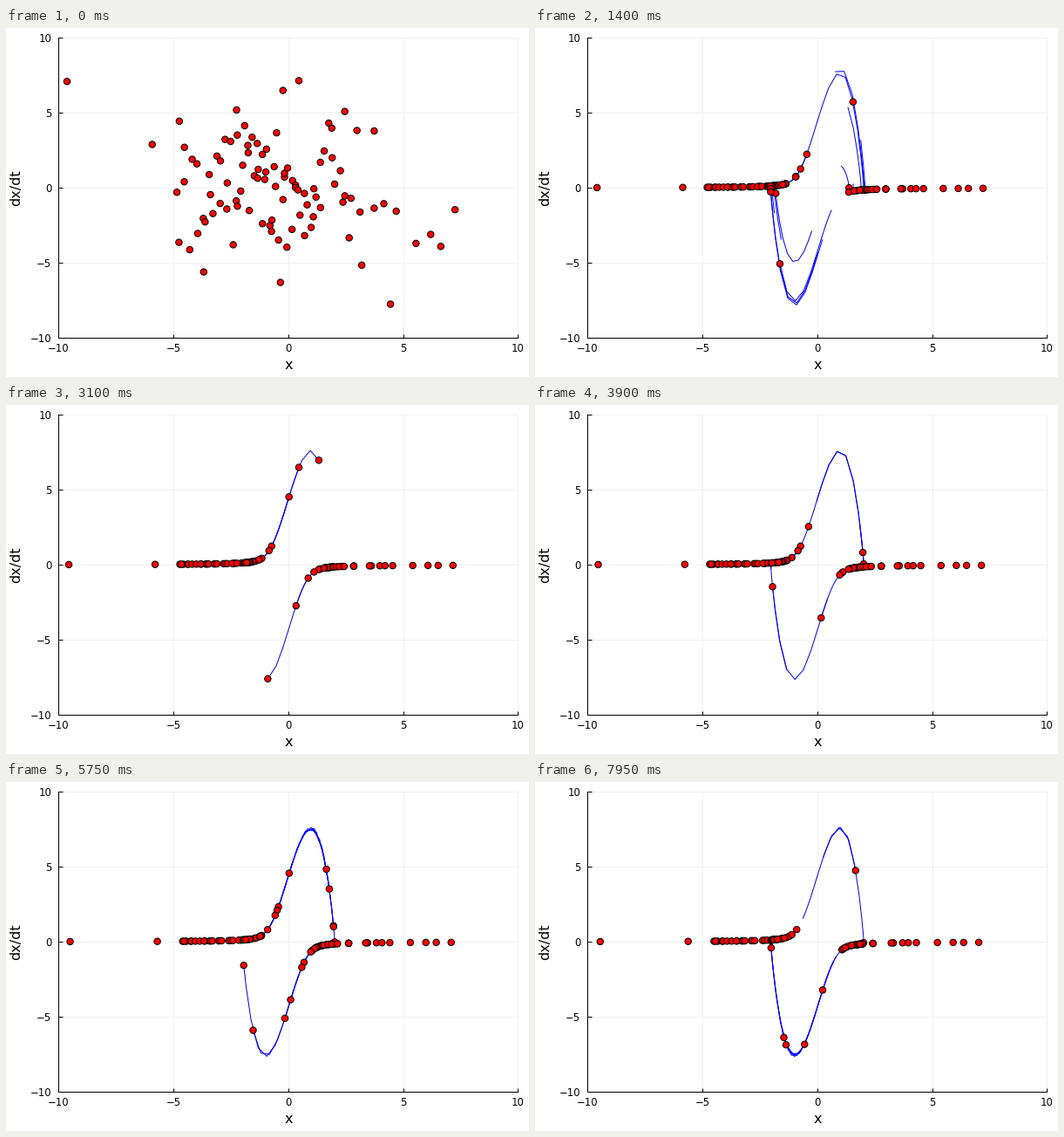
A matplotlib script that plays this animation: 600x400 px, repeating every 8000 ms.

```python
import numpy as np
import matplotlib.pyplot as plt
from matplotlib.animation import FuncAnimation
from matplotlib.collections import LineCollection

W, H, DPI = 600, 400, 100
PX = 72 / DPI                     # one pixel in points
LEFT, RIGHT, TOP, BOTTOM = 60.2, 587.4, 11.4, 355.2
FRAMES, INTERVAL = 160, 50
MU, DT, SUBSTEPS, TAIL = 5.0, 0.05, 25, 10
CLOUD = 79

plt.rcParams["font.family"] = "DejaVu Sans"

# Outlying starting states (x, dx/dt); the rest form a random cloud.
OUTLIERS = [
    (-9.63, 7.1), (-5.92, 2.9), (-4.74, 4.45), (-2.25, 5.2), (-0.23, 6.5),
    (0.46, 7.15), (2.46, 5.1), (3.74, 3.8), (-3.68, -5.6), (-0.34, -6.3),
    (3.2, -5.15), (3.74, -1.35), (4.16, -1.05), (4.7, -1.55), (4.45, -7.75),
    (5.56, -3.7), (6.2, -3.1), (6.64, -3.9), (7.26, -1.45),
]


def spread(t):
    """Map -1..1 to a bell-like spread, dense in the middle."""
    return 2.9 * t + 1.2 * t ** 3


def start_states():
    rng = np.random.default_rng(4)
    t = (2 * np.arange(CLOUD) + 1) / CLOUD - 1
    x = -0.9 + spread(t) + rng.uniform(-0.08, 0.08, CLOUD)
    v = 0.1 + 1.05 * spread(rng.permutation(t))
    return np.hstack([np.array(OUTLIERS).T, [x, v]])


def slope(s):
    x, v = s
    return np.array([v, MU * (1 - x * x) * v - x])


def rk4(s, h):
    a = slope(s)
    b = slope(s + h / 2 * a)
    c = slope(s + h / 2 * b)
    d = slope(s + h * c)
    return s + h / 6 * (a + 2 * b + 2 * c + d)


def simulate():
    s = start_states()
    path = [s.T]
    for _ in range(FRAMES - 1):
        for _ in range(SUBSTEPS):
            s = rk4(s, DT / SUBSTEPS)
        path.append(s.T)
    return np.array(path)         # frame, point, (x, v)


path = simulate()

fig = plt.figure(figsize=(W / DPI, H / DPI), dpi=DPI, facecolor="white")
ax = fig.add_axes([LEFT / W, 1 - BOTTOM / H,
                   (RIGHT - LEFT) / W, (BOTTOM - TOP) / H])
ax.set(xlim=(-10, 10), ylim=(-10, 10))


def label(x, y, text, size, **kw):
    fig.text(x / W, 1 - y / H, text, fontsize=size * PX, va="baseline", **kw)


ticks = range(-10, 11, 5)
ax.set_xticks(ticks, [])
ax.set_yticks(ticks, [])
ax.tick_params(direction="in", length=4.5 * PX, width=PX)
for side in ("top", "right"):
    ax.spines[side].set_visible(False)
for side in ("left", "bottom"):
    ax.spines[side].set_linewidth(PX)

for t in ticks:
    for rule in (ax.axvline, ax.axhline):
        rule(t, color="#f0f0f0", lw=PX, zorder=0, clip_on=False)
    text = str(t).replace("-", "\u2212")
    label(LEFT + (t + 10) / 20 * (RIGHT - LEFT), 370.7, text, 11.6,
          ha="center")
    label(52.2, BOTTOM - (t + 10) / 20 * (BOTTOM - TOP) + 4.3, text, 11.6,
          ha="right")
label(324, 391.2, "x", 16, ha="center")
label(16.2, 183.2, "dx/dt", 16, ha="center", rotation=90,
      rotation_mode="anchor")

tails = ax.add_collection(
    LineCollection([], colors="blue", linewidths=PX, zorder=3),
    autolim=False)
# One colour per dot keeps their positions from snapping to whole pixels.
dots = ax.scatter(*path[0].T, s=(7.4 * PX) ** 2, c=["red"] * path.shape[1],
                  edgecolors="black", linewidths=PX, zorder=4)


def draw(k):
    tails.set_segments(list(path[max(0, k - TAIL):k + 1].swapaxes(0, 1)))
    dots.set_offsets(path[k])
    return tails, dots


anim = FuncAnimation(fig, draw, frames=FRAMES, interval=INTERVAL,
                     repeat=True, repeat_delay=0, blit=False)
plt.show()
```
